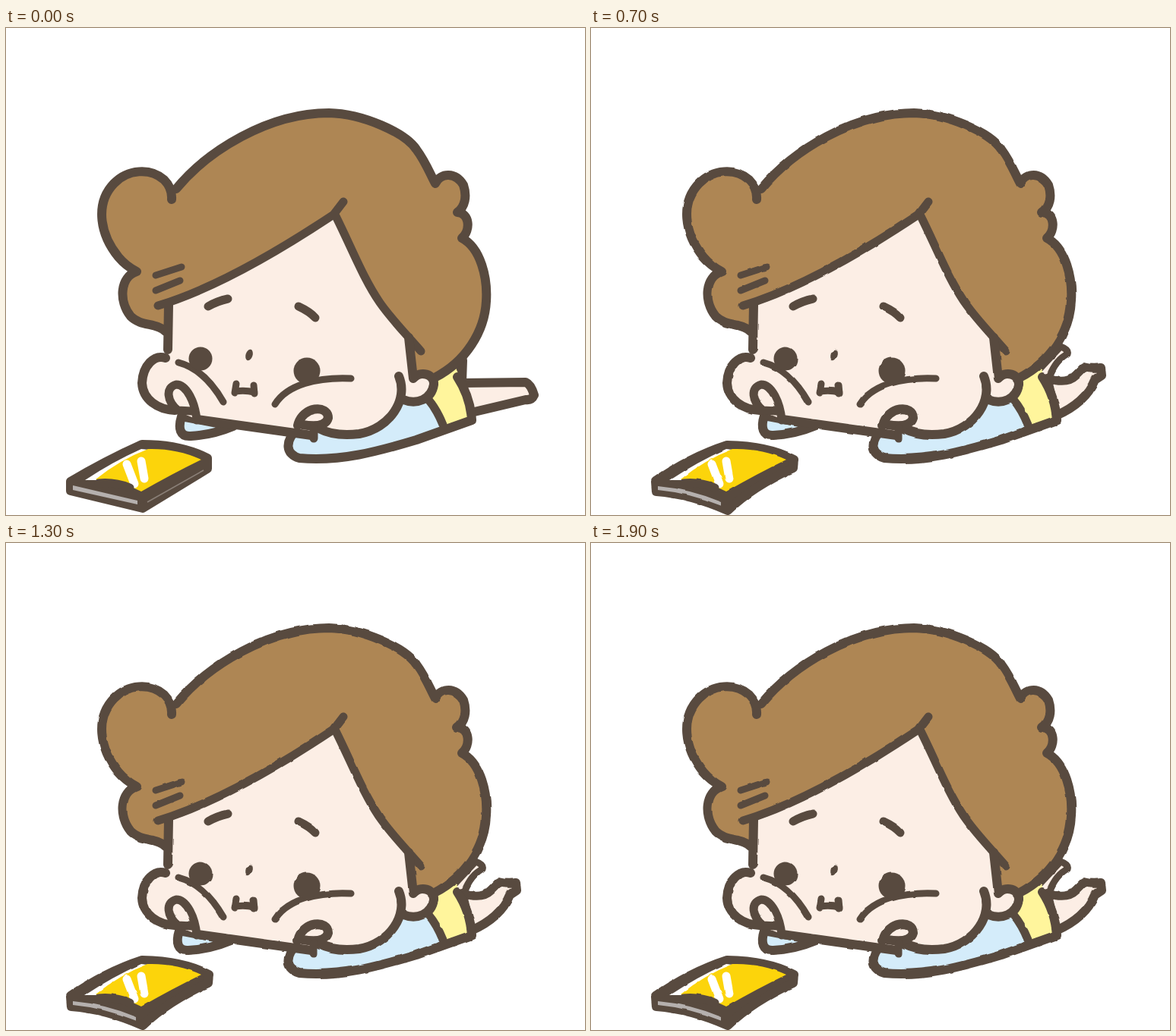
These frames come from a looping animation (762 px wide and 642 px high, 2 s). An HTML page:

```html
<!DOCTYPE html>
<html lang="en">
<head>
<meta charset="utf-8">
<title>Waiting by the phone</title>
<style>
  html, body { margin: 0; width: 100%; height: 100%; overflow: hidden; background: #fff; }
  svg { display: block; width: 762px; height: 642px; }
  .line, .ink { stroke: #584a3f; stroke-width: 12; stroke-linecap: round; stroke-linejoin: round; }
  .line { fill: none; }
  .thin { stroke-width: 11; }
  .fine { stroke-width: 9; }
  .dark { fill: #584a3f; }
  .skin { fill: #fceee5; }
  .hair { fill: #ae8654; }
  .blue { fill: #d4ecfa; }
  .yellow { fill: #fff59c; }
  .screen { fill: #fcd40b; }
  .white { fill: #fff; }
  .glint { stroke: #fff; stroke-width: 11; stroke-linecap: round; }
  .grey { fill: #b5b0ae; }

  /* legs swing down, middle, up, middle */
  .pose { visibility: hidden; animation: 400ms step-end infinite; }
  .down { animation-name: down; }
  .middle { animation-name: middle; }
  .up { animation-name: up; }
  @keyframes down { 0% { visibility: visible } 25%, 100% { visibility: hidden } }
  @keyframes middle { 0%, 50% { visibility: hidden } 25%, 75% { visibility: visible } 100% { visibility: hidden } }
  @keyframes up { 0%, 75%, 100% { visibility: hidden } 50% { visibility: visible } }
</style>
</head>
<body>
<svg viewBox="0 0 762 642">
  <defs>
    <filter id="rough" filterUnits="userSpaceOnUse" x="0" y="0" width="762" height="642" color-interpolation-filters="sRGB">
      <feTurbulence type="fractalNoise" baseFrequency=".06" numOctaves="1" seed="4"/>
      <feDisplacementMap in="SourceGraphic" scale="3" xChannelSelector="R" yChannelSelector="G"/>
    </filter>

    <g id="leftArm">
      <path class="ink blue" d="M231 512C226 528 229 539 243 538C262 537 280 533 299 525L252 516Z"/>
    </g>

    <g id="body">
      <path class="blue" d="M384 528C366 545 368 562 386 567C440 572 490 558 540 543L577 528Q570 505 556 489L520 480Z"/>
      <path class="yellow" d="M556 489L556 462L592 448Q608 485 613 517L577 528Q570 505 556 489Z"/>
      <path class="line" d="M384 528C366 545 368 562 386 567C440 572 490 558 540 543L613 517Q611 486 594 460"/>
      <path class="line thin" d="M556 490Q567 503 575 523"/>

      <path class="hair" d="M220 214C205 186 165 182 142 205C118 230 122 270 148 302Q158 314 170 321C150 328 148 360 164 380C178 394 195 390 210 400L536 457L562 463C605 440 630 400 632 360C634 330 625 290 600 277C612 266 610 244 594 243C604 236 607 222 602 207C592 190 572 190 565 205C558 192 552 176 540 160C525 138 470 113 425 112C345 112 265 162 222 212Z"/>
      <path class="skin" d="M213 364C270 345 350 300 433 246C455 290 470 330 492 362Q508 385 530 408L536 462C545 451 564 456 563 470C560 490 540 497 522 490C518 517 500 530 465 535C440 538 425 535 410 530L400 537L252 516L222 504C200 502 180 490 179 468C180 445 195 430 213 434Z"/>

      <path class="line" d="M218 226Q219 211 208 200C190 184 160 186 142 205C118 230 122 270 148 302Q158 314 172 321C150 328 148 360 164 380C178 394 197 388 210 400M214 365L213 424"/>
      <path class="line" d="M224 212C265 162 345 112 425 112C470 113 525 138 540 160C552 176 558 192 565 205C572 190 592 190 602 207C607 222 604 236 594 243C610 244 612 266 600 277C625 290 634 330 632 360C630 400 605 440 564 461"/>
      <path class="line thin" d="M200 366C270 345 350 300 431 246L444 229M433 246C455 290 470 330 492 362C508 385 528 405 546 426"/>
      <path class="line fine" d="M197 326L231 315M197 346L229 333"/>
      <path class="line" d="M530 408L536 462C545 451 564 456 563 470C560 490 540 497 523 490M517 459C530 490 505 528 465 535C440 538 425 535 412 528M252 516L402 537"/>

      <path class="line" d="M210 435C195 430 180 445 179 468C180 490 200 503 222 504"/>
      <path class="ink skin thin" d="M251 517C249 494 238 470 224 470C209 474 212 492 226 504L244 505"/>
      <path class="ink skin" d="M384 524C390 498 424 496 424 514C421 526 403 525 390 523"/>
      <path class="line thin" d="M405 528V541"/>

      <path class="line fine" d="M227 441C250 447 270 465 286 493M354 496C370 470 410 460 454 462"/>
      <path class="line thin" d="M266 367Q278 360 292 357M385 367Q400 374 407 382"/>
      <circle class="dark" cx="256" cy="436" r="15.5"/>
      <circle class="dark" cx="396" cy="452" r="17.5"/>
      <ellipse class="dark" cx="320" cy="431" rx="4.5" ry="7.5" transform="rotate(18 320 431)"/>
      <path class="line fine" d="M303 469L301 481M302 479Q314 477 327 480M326 471L327 482"/>
    </g>

    <g id="glass">
      <path class="white" d="M104 596Q140 572 178 555L188 556L122 596Z"/>
      <path class="screen" d="M187 555Q225 554 257 569Q220 587 178 611L165 605Q145 595 118 595Q150 569 187 555Z"/>
      <path class="glint" d="M159 575L169 601M178 571L182 594"/>
      <path class="line thin" d="M122 600Q143 598 163 606"/>
    </g>

    <g id="flatPhone">
      <path class="ink dark" d="M85 598Q130 571 179 549Q230 549 265 567L265 581L180 633L85 610Z"/>
      <use href="#glass"/>
      <path class="grey" d="M88 603L173 623V628L88 609Z"/>
      <path d="M186 625L260 583" stroke="#8b8078" stroke-width="1.5"/>
    </g>
    <g id="bentPhone">
      <path class="ink dark" d="M85 598Q130 566 179 550Q234 551 267 569L266 580Q213 604 180 636Q130 614 86 611Z"/>
      <use href="#glass"/>
      <path class="grey" d="M88 604Q132 608 172 625V630Q130 613 88 609Z"/>
    </g>
  </defs>

  <g class="pose down">
    <path class="ink skin" d="M588 450L601 438L600 466Z"/>
    <path class="ink skin" d="M600 468L684 467Q691 470 695 484Q692 491 684 490L612 507Z"/>
    <use href="#leftArm"/><use href="#body"/><use href="#flatPhone"/>
  </g>

  <g class="pose middle">
    <g filter="url(#rough)">
      <path class="ink skin fine" d="M590 450L618 420Q629 424 627 430Q612 437 603 460"/>
      <path class="ink skin" d="M600 461Q626 470 638 458L649 447Q660 450 671 448L672 458L663 464Q651 494 612 511Z"/>
      <use href="#leftArm" x="-3" y="-1"/><use href="#body"/><use href="#bentPhone"/>
    </g>
  </g>

  <g class="pose up">
    <path class="ink skin" d="M596 462Q628 466 642 453L662 452L666 462L654 470L610 490Z"/>
    <path class="ink skin" d="M600 464Q615 458 618 440L626 422L642 421L646 431L638 438Q642 480 612 510Z"/>
    <use href="#leftArm"/><use href="#body"/><use href="#flatPhone"/>
  </g>
</svg>
</body>
</html>
```
